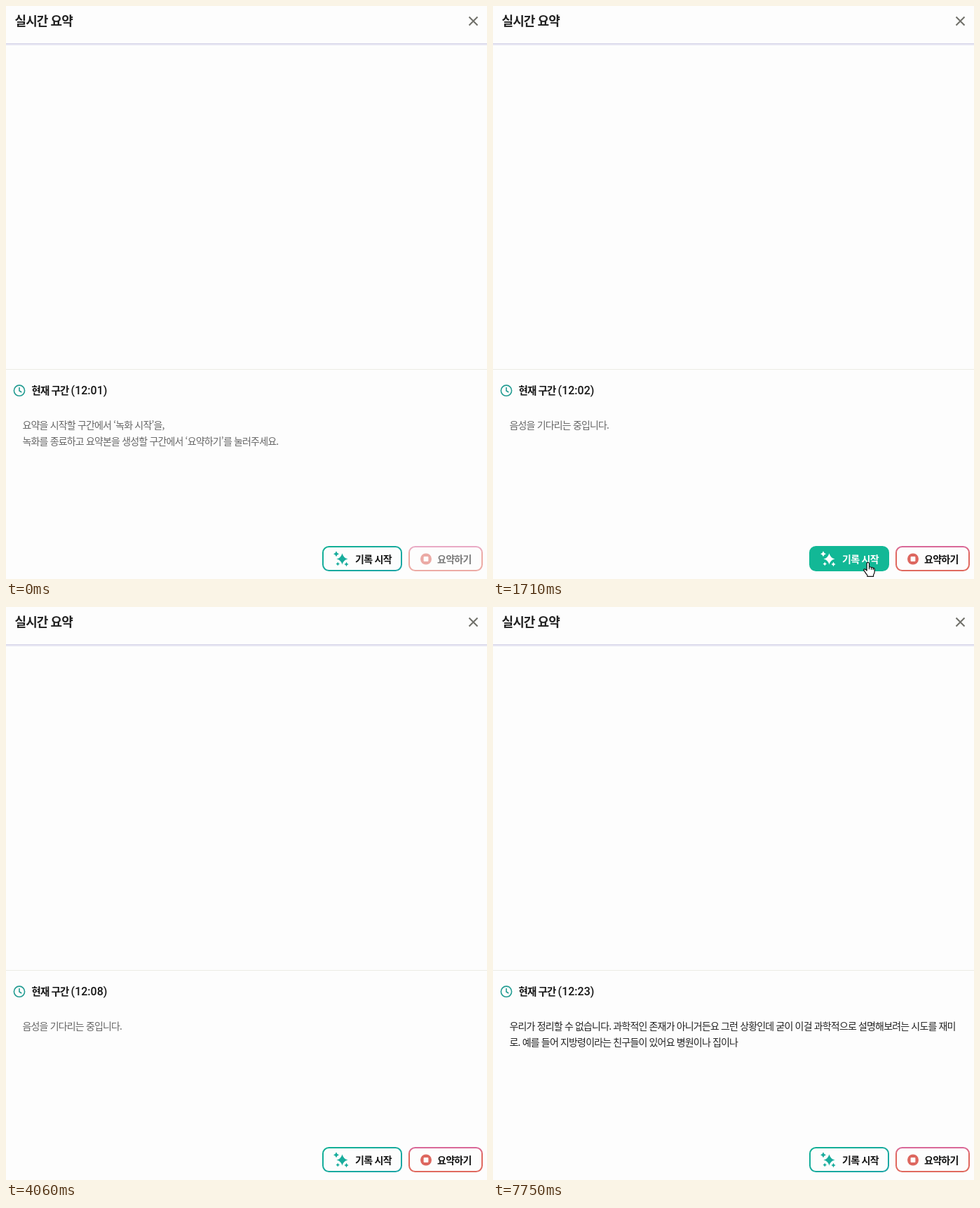
Write an HTML page that moves like this. It is 686 px wide and 816 px high and loops after 7.99 s.

```html
<!DOCTYPE html>
<html lang="ko">
<head>
<meta charset="utf-8">
<style>
  html, body { margin: 0; width: 100%; height: 100%; overflow: hidden; background: #fdfdfd; }
  svg { display: block; }
  text { font: 14px "Noto Sans CJK KR", "Noto Sans CJK", "Noto Sans KR", sans-serif; letter-spacing: -.84px; fill: #222; white-space: pre; }
  .bold { font-weight: 600; letter-spacing: -.7px; fill: #151515; }
  #time { font: 500 16px Roboto, sans-serif; letter-spacing: 0; }
</style>
</head>
<body>
<svg width="686" height="816" viewBox="0 0 686 816">
  <defs>
    <linearGradient id="teal" x2="1" y2="1">
      <stop stop-color="#12b095"/><stop offset="1" stop-color="#1da5a6"/>
    </linearGradient>
    <linearGradient id="red" x2="0" y2="1">
      <stop stop-color="#d9689a"/><stop offset=".3" stop-color="#e0695f"/><stop offset="1" stop-color="#e0695f"/>
    </linearGradient>
    <path id="star" d="M0-1Q.2-.2 1 0Q.2.2 0 1Q-.2.2-1 0Q-.2-.2 0-1Z"/>
  </defs>

  <text x="12.5" y="27.8" class="bold" style="font-size:18px;letter-spacing:-.9px;fill:#222">실시간 요약</text>
  <path d="M660.5 15.5l12 12m0-12l-12 12" stroke="#70706a" stroke-width="2"/>
  <path d="M0 53.5H686" stroke="#d6d5e9"/>
  <path d="M0 55H686" stroke="#e8e7f3" stroke-width="2"/>
  <path d="M0 517.5H686" stroke="#ebebe4"/>

  <g fill="none" stroke="#239c92" stroke-width="1.6">
    <circle cx="19" cy="547.7" r="7.6"/>
    <path d="M19 543v5l3.3 2"/>
  </g>
  <text x="36.5" y="552.6" class="bold" style="font-size:14.5px;letter-spacing:-.9px">현재 구간</text>
  <text x="92.6" y="552.6" class="bold" id="time"></text>
  <text x="23.5" y="602.3" class="line"></text>
  <text x="23.5" y="625.3" class="line"></text>

  <g id="record">
    <rect x="452" y="770" width="112" height="34" rx="8.5" stroke="url(#teal)" stroke-width="2"/>
    <g id="stars">
      <use href="#star" transform="translate(479.5 787.5) scale(8)"/>
      <use href="#star" transform="translate(471 780.2) scale(4)"/>
      <use href="#star" transform="translate(473.2 794.5) scale(2.8)"/>
      <use href="#star" transform="translate(485.5 795) scale(3.2)"/>
    </g>
    <text x="498" y="792.8" class="bold" id="label">기록 시작</text>
  </g>
  <g id="summary">
    <rect x="575" y="770" width="104" height="34" rx="8.5" fill="#fdfdfd" stroke="url(#red)" stroke-width="2"/>
    <circle cx="599" cy="787.5" r="8" fill="#dd675f"/>
    <rect x="595.6" y="784.1" width="6.8" height="6.8" rx="1" fill="#fff"/>
    <text x="615" y="792.8" class="bold">요약하기</text>
  </g>

  <g id="cursor" fill="#fff" stroke="#111" stroke-width="1.2" stroke-linejoin="round">
    <path id="arrow" d="M0 0V16L3.7 12.6L6.4 18.6L9 17.4L6.4 11.6H11.4Z"/>
    <path id="hand" d="M-1.7 1.4Q-1.5 0 0 0T1.7 1.4V7Q3.6 5.6 4.7 7.5Q6.4 6.5 7.3 8.3Q9.3 7.6 9.4 9.7V13.5Q9.2 16 7.8 17.5V20H-1V18Q-3 16-4.7 13Q-6.6 10.8-5.9 9.9Q-4.8 8.8-3 10.4L-1.7 11.7ZM1.7 7V10M4.7 7.5V10.3M7.3 8.3V10.7"/>
  </g>
</svg>
<script>
const LOOP = 7990, CLICK = 840;
const $ = id => document.getElementById(id);
const lines = document.querySelectorAll(".line");

// moments at which the clock gains a second, counted from 12:01
const ticks = [840, 1810, 2860, 3110, 3350, 3590, 3840, 4170, 4410, 4660, 4900, 5130,
  5470, 5680, 5960, 6200, 6440, 6660, 6930, 7170, 7510, 7720];

// recognised speech: [time, line, words]
const speech = [
  [4660, 0, "우리가 정리할 수 없습니다."],
  [5230, 0, " 과학적인 존재가 아니거든요"],
  [5710, 0, " 그런 상황인데 굳이 이걸"],
  [6220, 0, " 과학적으로 설명해보려는 시도를"],
  [6690, 0, " 재미"],
  [6690, 1, "로. 예를 들어"],
  [7270, 1, " 지방령이라는 친구들이 있어요"],
  [7750, 1, " 병원이나 집이나"]
];
const guide = ["요약을 시작할 구간에서 ‘녹화 시작’을,",
  "녹화를 종료하고 요약본을 생성할 구간에서 ‘요약하기’를 눌러주세요."];

// pointer path: [time, x, y]
const path = [[300, 560, 830], [640, 517, 786], [1650, 517, 786], [1900, 590, 812],
  [2110, 652, 806], [2400, 676, 832]];

function pointer(t) {
  const i = path.findIndex(p => p[0] > t);
  if (i < 1) return null;
  const [a, b] = [path[i - 1], path[i]];
  const k = (t - a[0]) / (b[0] - a[0]);
  return [1, 2].map(n => a[n] + (b[n] - a[n]) * k);
}

function message(t) {
  if (t < CLICK) return guide;
  const heard = speech.filter(s => s[0] <= t);
  if (!heard.length) return ["음성을 기다리는 중입니다.", ""];
  return [0, 1].map(n => heard.filter(s => s[1] === n).map(s => s[2]).join(""));
}

function draw(t) {
  const sec = 1 + ticks.filter(m => m <= t).length;
  $("time").textContent = `(12:${String(sec).padStart(2, "0")})`;

  const color = t < speech[0][0] ? "#666" : "#222";
  message(t).forEach((s, n) => {
    lines[n].textContent = s;
    lines[n].style.fill = color;
  });

  const pos = pointer(t);
  const over = !!pos && pos[0] > 451 && pos[0] < 565 && pos[1] > 769 && pos[1] < 805;
  $("cursor").style.display = pos ? "" : "none";
  if (pos) $("cursor").setAttribute("transform", `translate(${pos})`);
  $("hand").style.display = over ? "" : "none";
  $("arrow").style.display = over ? "none" : "";

  const box = $("record").firstElementChild.style;
  box.fill = over ? "#12b896" : "#fdfdfd";
  box.stroke = over ? "#12b896" : "";
  $("stars").style.fill = over ? "#fff" : "#18ac9c";
  $("label").style.fill = over ? "#fff" : "#151515";
  $("summary").style.opacity = t < CLICK ? .55 : 1;
}

const start = performance.now();
function frame(now) {
  draw(Math.max(0, now - start) % LOOP);
  requestAnimationFrame(frame);
}
draw(0);
requestAnimationFrame(frame);
</script>
</body>
</html>
```
